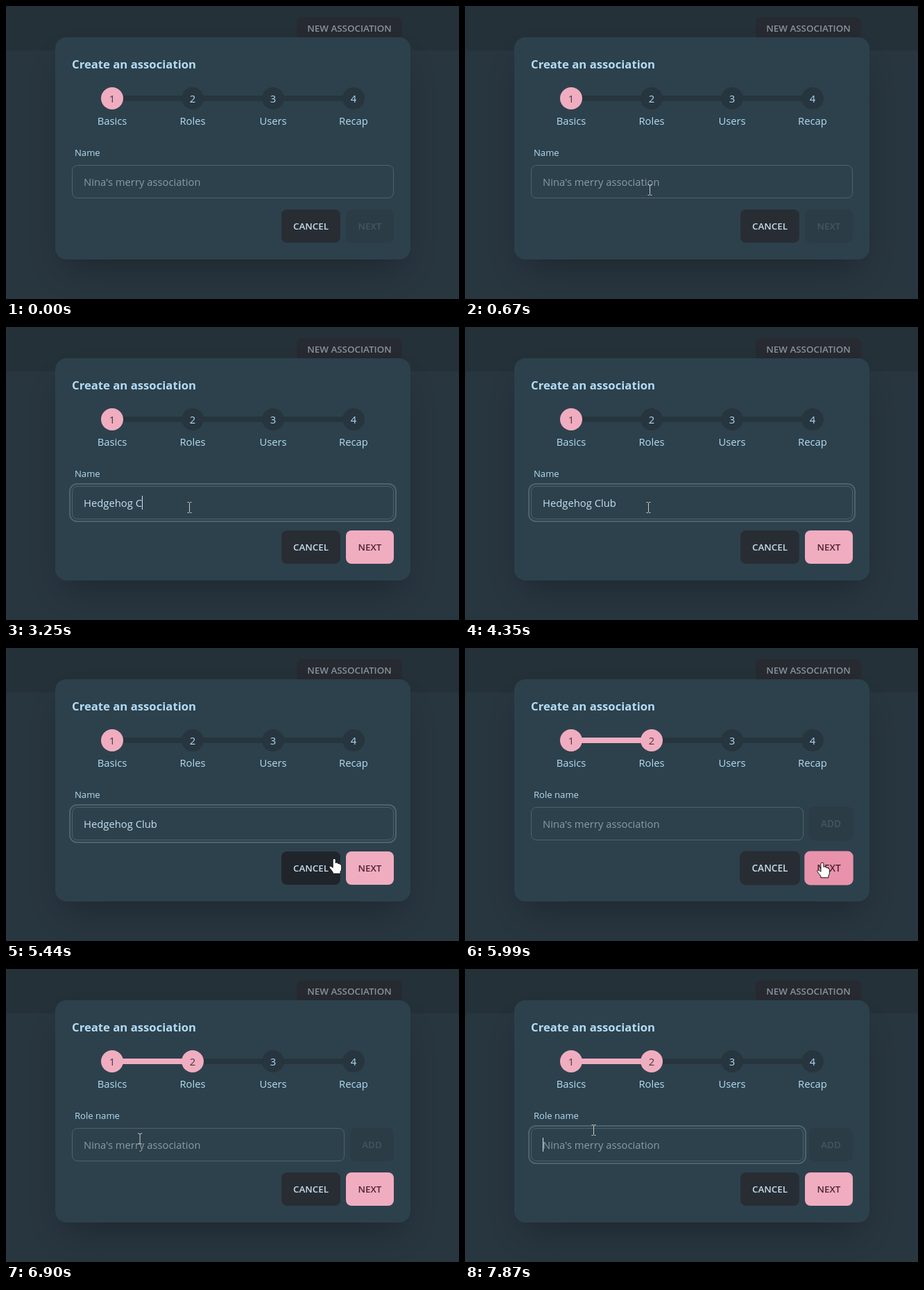
Recreate the animation shown at these times as an HTML page. Size 653 by 422 pixels, loop 8000 ms.

```html
<!DOCTYPE html>
<html lang="en">
<head>
<meta charset="utf-8">
<title>Create an association</title>
<style>
html, body { margin: 0; width: 100%; height: 100%; overflow: hidden; background: #27353f; }
svg { display: block; width: 653px; height: 422px; }
text { font: 14.8px "Open Sans", "Noto Sans", sans-serif; fill: #b3dcf5; white-space: pre; }
.mid { text-anchor: middle; }
.title { font-size: 16.7px; font-weight: 700; }
.label { font-size: 13.1px; }
.btn text { font-size: 13.4px; font-weight: 600; text-anchor: middle; }
.btn { transform-box: fill-box; transform-origin: center; }
</style>
</head>
<body>
<svg id="stage" viewBox="0 0 653 422">
  <defs>
    <filter id="soft" x="-30%" y="-50%" width="160%" height="200%"><feGaussianBlur stdDeviation="25"/></filter>
  </defs>
  <rect width="653" height="422" fill="#283640"/>
  <rect width="653" height="64" fill="#253139"/>
  <g class="btn">
    <rect x="419" y="16" width="152" height="48" rx="8" fill="#272a31"/>
    <text x="495" y="37" style="fill:#89939b">NEW ASSOCIATION</text>
  </g>
  <rect x="83" y="82" width="488" height="296" rx="16" opacity=".25" filter="url(#soft)"/>
  <rect x="71" y="45" width="512" height="320" rx="16" fill="#2d414c"/>
  <text class="title" x="95" y="90">Create an association</text>
  <g id="steps"></g>
  <text id="label" class="label" x="99" y="216"></text>
  <rect id="ring" x="92" y="226" height="54" rx="10.5" fill="none" stroke="#4d626f" stroke-width="2"/>
  <rect id="field" x="95.5" y="229.5" height="47" rx="7.5" fill="none" stroke="#4d626f"/>
  <text id="value" x="112" y="259"></text>
  <rect id="caret" y="243" width="1" height="20" fill="#d3e8f5"/>
  <g id="buttons"></g>
  <g id="cursor" stroke-linejoin="round">
    <path id="ibeam" fill="none" stroke="#d3c9c1" d="M-3 -7.5H-1L0 -6.5L1 -7.5H3M0 -6.5V6.5M-3 7.5H-1L0 6.5L1 7.5H3"/>
    <path id="arrow" fill="#fff" stroke="#111" d="M.5 .5V16.5L4 13L6.5 18.5L8.8 17.6L6.4 12.2H11.5Z"/>
    <path id="hand" fill="#fff" stroke="#111" d="M-2 2Q-2 .3 0 .3Q2 .3 2 2V6.5Q3 5.6 4.6 6.3Q5.5 6.8 5.6 7.5Q8 6.9 8.4 8.6Q10.6 8.4 10.6 11V14Q10.6 17 9 19.3V22H-2V20Q-4 17 -6.6 14Q-8 12 -6.4 11.2Q-4.6 10.6 -2 13.4Z"/>
  </g>
</svg>
<script>
const LOOP = 8000;
const FOCUS = 740, TYPE = 1470, PRESS = 5830, SWITCH = 5890, REFOCUS = 7640;
const BLINK = 530;
const NAME = 'Hedgehog Club';
const HINT = "Nina's merry association";
const KEY_TIMES = [1470, 1620, 1880, 2140, 2340, 2440, 2590, 2640, 2890, 3250, 3550, 3650, 3800];
// time, x, y of the pointer
const PATH = [
  [150, 318, 401], [400, 296, 335], [690, 264.5, 260], [4960, 264.5, 260],
  [5200, 345, 271], [5440, 473, 303], [5740, 515, 309], [5990, 515, 309],
  [6260, 500, 262], [6630, 288.5, 261], [6850, 205.5, 247], [7110, 142.5, 234],
  [7540, 142.5, 234], [7820, 185.5, 232]
];
const PINK = [240, 173, 192], PINK_HOVER = [229, 131, 159], PINK_TEXT = [78, 34, 52];
const DISABLED = [43, 60, 71], DISABLED_TEXT = [69, 86, 97];
const DARK = [40, 45, 52], DARK_HOVER = [32, 37, 43], LIGHT = [200, 220, 234];
const TRACK = '#27353f';

const $ = id => document.getElementById(id);
const clamp = v => Math.max(0, Math.min(1, v));
const ease = v => 1 - (1 - clamp(v)) ** 2;
const lerp = (a, b, p) => a + (b - a) * p;
const mix = (a, b, p) => a.map((v, i) => lerp(v, b[i], p));
const rgb = c => `rgb(${c.map(Math.round)})`;
const show = (el, on) => el.setAttribute('display', on ? 'inline' : 'none');

function add(parent, tag, attrs, text = '') {
  const el = document.createElementNS('http://www.w3.org/2000/svg', tag);
  for (const key in attrs) el.setAttribute(key, attrs[key]);
  el.textContent = text;
  return parent.appendChild(el);
}

const stepX = i => 153 + 116 * i;
const lines = [0, 1, 2].map(i => add($('steps'), 'rect', { x: stepX(i), y: 129, width: 116, height: 8 }));
const dots = ['Basics', 'Roles', 'Users', 'Recap'].map((name, i) => {
  const circle = add($('steps'), 'circle', { cx: stepX(i), cy: 133, r: 16 });
  const digit = add($('steps'), 'text', { class: 'mid', x: stepX(i), y: 138.5 }, i + 1);
  add($('steps'), 'text', { class: 'mid', x: stepX(i), y: 171 }, name);
  return { circle, digit };
});

function makeButton(x, y, width, name) {
  const group = add($('buttons'), 'g', { class: 'btn' });
  const box = add(group, 'rect', { x, y, width, height: 48, rx: 8 });
  const text = add(group, 'text', { x: x + width / 2, y: y + 29 }, name);
  return {
    group,
    paint(fill, ink, scale) {
      box.style.fill = rgb(fill);
      text.style.fill = rgb(ink);
      group.style.transform = `scale(${scale})`;
    }
  };
}
const cancel = makeButton(397, 293, 85, 'CANCEL');
const next = makeButton(490, 293, 69, 'NEXT');
const addRole = makeButton(496, 229, 63, 'ADD');

function pointerAt(t) {
  let i = 0;
  while (i < PATH.length - 2 && t >= PATH[i + 1][0]) i++;
  const [a, b] = [PATH[i], PATH[i + 1]];
  const p = clamp((t - a[0]) / (b[0] - a[0]));
  return [lerp(a[1], b[1], p), lerp(a[2], b[2], p)];
}

function drawPointer(t, fieldEnd) {
  const [x, y] = pointerAt(t);
  const inField = x > 95 && x < fieldEnd && y > 229 && y < 277;
  const inButton = y > 293 && y < 341 && ((x > 397 && x < 482) || (x > 490 && x < 559));
  show($('cursor'), t >= 150);
  show($('ibeam'), inField);
  show($('hand'), inButton);
  show($('arrow'), !inField && !inButton);
  $('cursor').setAttribute('transform', `translate(${x} ${y})`);
}

function drawField(t, second) {
  const focused = second ? t >= REFOCUS : t >= FOCUS;
  const end = second ? 488 : 559;
  const typed = second ? 0 : KEY_TIMES.filter(k => k <= t).length;
  const value = $('value');
  $('label').textContent = second ? 'Role name' : 'Name';
  $('field').setAttribute('width', end - 96);
  $('ring').setAttribute('width', end - 89);
  show($('ring'), focused && !(t >= PRESS && second && t < REFOCUS));
  value.textContent = typed ? NAME.slice(0, typed) : HINT;
  value.style.fill = typed ? '#c3e0f2' : '#889ca8';
  const since = typed ? KEY_TIMES[typed - 1] : second ? REFOCUS : FOCUS;
  show($('caret'), focused && t < PRESS + (second ? LOOP : 0) && Math.floor((t - since) / BLINK) % 2 === 0);
  $('caret').setAttribute('x', Math.round(112 + (typed ? value.getComputedTextLength() - 0.5 : 0)));
  return end;
}

function popScale(t) {
  const p = (t - SWITCH) / 250;
  if (p < 0 || p > 1) return 1;
  return p < 0.4 ? lerp(0.98, 1.02, ease(p / 0.4)) : lerp(1.02, 1, ease((p - 0.4) / 0.6));
}

function drawButtons(t, second) {
  const pop = popScale(t);
  const over = ease((t - 5370) / 60) - ease((t - 5570) / 150);
  cancel.paint(mix(DARK, DARK_HOVER, over), LIGHT, pop);

  const enabled = t < TYPE ? 0 : 0.08 + 0.92 * ease((t - TYPE) / 260);
  const hover = second
    ? ease((t - SWITCH) / 250) - ease((t - 6260) / 200)
    : ease((t - 5570) / 170);
  const base = mix(DISABLED, PINK, enabled);
  const press = t >= PRESS && !second ? 0.97 : pop;
  next.paint(mix(base, PINK_HOVER, hover), mix(DISABLED_TEXT, PINK_TEXT, enabled), press);

  show(addRole.group, second);
  addRole.paint(DISABLED, DISABLED_TEXT, pop);
}

function draw(t) {
  const second = t >= SWITCH;
  const reached = second ? 1 : 0;
  lines.forEach((line, i) => line.style.fill = i < reached ? rgb(PINK) : TRACK);
  dots.forEach(({ circle, digit }, i) => {
    circle.style.fill = i <= reached ? rgb(PINK) : TRACK;
    digit.style.fill = i <= reached ? '#4a3440' : '#b3dcf5';
  });
  const fieldEnd = drawField(t, second);
  drawButtons(t, second);
  drawPointer(t, fieldEnd);
}

const start = performance.now();
function tick() {
  draw((performance.now() - start) % LOOP);
  requestAnimationFrame(tick);
}
tick();
</script>
</body>
</html>
```
